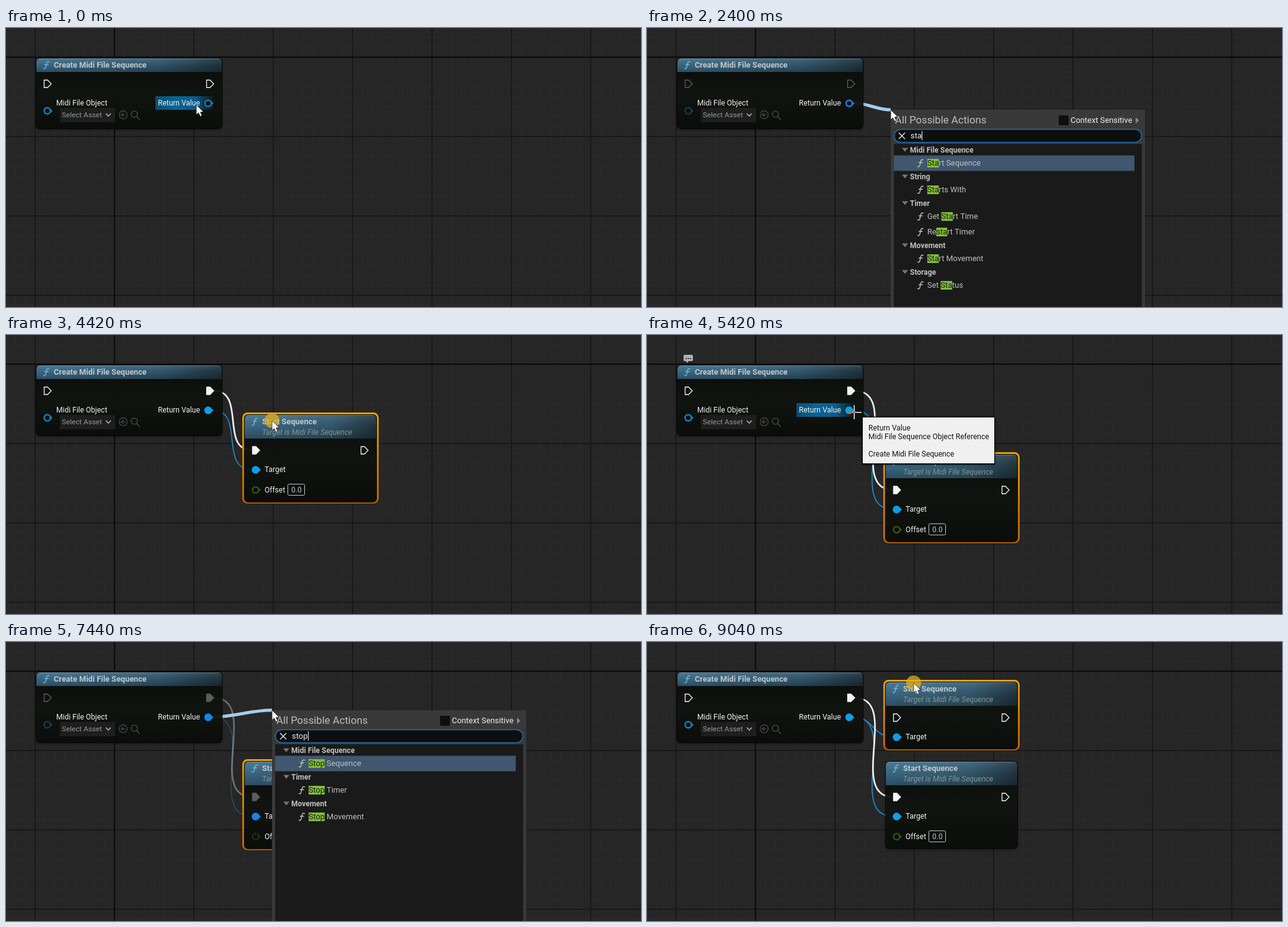
Write an HTML page with a canvas that moves like this. It is 1024x450 px and loops after 9440 ms.

```html
<!DOCTYPE html>
<html>
<head>
<meta charset="utf-8">
<style>
html, body { margin: 0; width: 100%; height: 100%; overflow: hidden; background: #262626; }
canvas { display: block; }
</style>
</head>
<body>
<canvas id="stage" width="1024" height="450"></canvas>
<script>
const g = document.getElementById('stage').getContext('2d');
const LOOP = 9440;
const FONT = 'Roboto, "Open Sans", sans-serif';
const BLUE = '#0e9fe6', RING = '#0f82bd', DIM = '#5c5c5c';
const RETURN = [333, 121], EXEC = [335, 90];

const categories = ['Accessibility', 'Activation', 'Actor', 'Add Component', 'Add Event', 'Advanced', 'AI',
  'Android File Server', 'Android Permission', 'Anim Notify', 'Animation', 'Animation Attributes',
  'Animation Data', 'Animation Data Model', 'Animation Graph'];

// '#' marks a category, '*' a starred row
const pathRows = ['*Not Equal ( != )', '*Subtract', '#Paths', 'Automation Dir', 'Automation Log Dir',
  'Automation Transient Dir', 'Bug It Dir', 'Change Extension', 'Cloud Dir',
  'Collapse Relative Directories', 'Combine', 'Convert from Sandbox Path'];
const library = {
  'Midi File Sequence': ['Start Sequence', 'Stop Sequence'],
  'String': ['Starts With', 'To String', 'Substring'],
  'Timer': ['Get Start Time', 'Restart Timer', 'Stop Timer'],
  'Movement': ['Stop Movement', 'Start Movement'],
  'Storage': ['Get Storage', 'Set Status']
};

const nodeTip = name => [192, 84, 21, [[32, name], [60, 'Target is Midi File Sequence']]];
const pinTip = [214, 76, 10, [[21, 'Return Value'], [35, 'Midi File Sequence Object Reference'],
  [63, 'Create Midi File Sequence']]];

// Each step changes part of the state from its time on
const steps = [
  [0, { at: [307, 124], cursor: 'arrow', hover: true }],
  [200, { at: [326, 123], cursor: 'cross' }],
  [400, { at: [335, 123], cursor: 'arrow', hover: false, drag: true, click: true }],
  [600, { at: [356, 126] }],
  [800, { at: [380, 130] }],
  [1000, { at: [393, 132] }],
  [1200, { menu: [393, 132], click: false, query: '' }],
  [1820, { query: 's' }],
  [2020, { query: 'st' }],
  [2220, { query: 'sta' }],
  [2420, { query: 'star' }],
  [2620, { query: 'start' }],
  [3020, { menu: null, drag: false, start: [384, 128], selected: 'start' }],
  [3220, { cursor: 'move' }],
  [3420, { tip: nodeTip('Start Sequence') }],
  [3620, { at: [407, 134], tip: null }],
  [3820, { at: [424, 137] }],
  [4020, { at: [429, 138], tip: nodeTip('Start Sequence') }],
  [4420, { tip: null, click: true, cursor: 'arrow' }],
  [4620, { at: [429, 170], start: [384, 160] }],
  [4820, { at: [429, 202], start: [384, 192] }],
  [5020, { at: [396, 168], click: false }],
  [5220, { at: [340, 126], hover: true, bubble: [59, 32] }],
  [5420, { at: [334, 124], cursor: 'cross', tip: pinTip }],
  [5620, { tip: null, hover: false, bubble: null, cursor: 'arrow', drag: true, click: true }],
  [5820, { at: [368, 120] }],
  [6020, { at: [408, 113] }],
  [6220, { at: [429, 110] }],
  [6440, { menu: [429, 110], click: false, query: '' }],
  [6840, { query: 's' }],
  [7040, { query: 'st' }],
  [7240, { query: 'sto' }],
  [7440, { query: 'stop' }],
  [7840, { menu: null, drag: false, stop: [416, 96], selected: 'stop' }],
  [8040, { at: [444, 106], cursor: 'move', bubble: [427, 80] }],
  [8240, { at: [456, 103], tip: nodeTip('Stop Sequence') }],
  [8840, { at: [443, 85], tip: null, bubble: null, stop: [400, 80], cursor: 'arrow', click: true }],
  [9040, { at: [430, 66], stop: [384, 64] }]
];

function rect(x, y, w, h, color) {
  g.fillStyle = color;
  g.fillRect(x, y, w, h);
}

function round(x, y, w, h, r, fill, stroke, width = 1) {
  g.beginPath();
  g.roundRect(x, y, w, h, r);
  paint(fill, stroke, width);
}

function poly(points, fill, stroke, width, open) {
  g.beginPath();
  for (let i = 0; i < points.length; i += 2) g.lineTo(points[i], points[i + 1]);
  if (!open) g.closePath();
  paint(fill, stroke, width);
}

function circle(x, y, r, fill, stroke, width) {
  g.beginPath();
  g.arc(x, y, r, 0, 7);
  paint(fill, stroke, width);
}

function paint(fill, stroke, width = 1) {
  if (fill) { g.fillStyle = fill; g.fill(); }
  if (stroke) { g.strokeStyle = stroke; g.lineWidth = width; g.stroke(); }
}

function text(str, x, y, size, color, style = '') {
  g.font = `${style} ${size}px ${FONT}`;
  g.fillStyle = color;
  g.fillText(str, x, y);
}

function gradient(x0, y0, x1, y1, ...colors) {
  const grad = g.createLinearGradient(x0, y0, x1, y1);
  colors.forEach((c, i) => grad.addColorStop(i / (colors.length - 1), c));
  return grad;
}

function grid() {
  rect(0, 0, 1024, 450, '#262626');
  const lines = (gap, color) => {
    for (let p = 46 % gap; p < 1024; p += gap) {
      rect(p, 0, 2, 450, color);
      rect(0, p, 1024, 2, color);
    }
  };
  lines(16, '#292929');
  lines(128, '#191919');
  rect(174, 0, 2, 450, '#0a0a0a');
  rect(0, 46, 1024, 2, '#0a0a0a');
}

function wire([x0, y0], [x1, y1], color, width) {
  const d = (Math.abs(x1 - x0) + Math.abs(y1 - y0)) / 3;
  g.beginPath();
  g.moveTo(x0, y0);
  g.bezierCurveTo(x0 + d, y0, x1 - d, y1, x1, y1);
  paint(null, color, width);
}

function execPin(x, y, filled, dim) {
  const color = dim ? DIM : '#f4f4f4';
  poly([x - 5.5, y - 6, x, y - 6, x + 6, y, x, y + 6, x - 5.5, y + 6], filled && color, color, 1.3);
}

function dataPin(x, y, color, filled) {
  circle(x, y, 5, filled ? color : '#0a0d0c', color, 2.4);
  poly([x + 5.5, y - 3, x + 8.5, y, x + 5.5, y + 3], color);
}

function funcIcon(x, y, color) {
  g.beginPath();
  g.moveTo(x - 5, y + 5);
  g.bezierCurveTo(x - 1, y + 8, x - .5, y + 1, x, y - 1);
  g.bezierCurveTo(x + .5, y - 5, x + 2, y - 7, x + 5, y - 5);
  g.moveTo(x - 3, y - 1);
  g.lineTo(x + 3.5, y - 1);
  paint(null, color, 1.4);
}

function lens(x, y, r, color) {
  circle(x, y, r, null, color, 1.6);
  poly([x + r * .7, y + r * .7, x + r * 1.7, y + r * 1.8], null, color, 1.8, true);
}

function nodeBox(x, y, w, h, bar, title, selected) {
  if (selected) {
    round(x - 1.5, y - 1.5, w + 3, h + 2, 7, null, gradient(0, y, 0, y + h, '#f5ab05', '#d06f05'), 3);
  }
  g.save();
  g.shadowColor = 'rgba(0,0,0,.55)';
  g.shadowBlur = 5;
  g.shadowOffsetY = 1;
  round(x + .5, y + .5, w - 1, h - 1, 6, gradient(0, y, 0, y + h, 'rgba(8,10,8,.9)', 'rgba(16,20,15,.9)', 'rgba(10,12,9,.92)'));
  g.restore();
  g.save();
  g.beginPath();
  g.roundRect(x + 1, y + 1, w - 2, h - 2, 5);
  g.clip();
  rect(x, y, w, bar, gradient(x, 0, x + w, 0, '#3f6f8c', '#3c6882', '#345b72', '#22353f'));
  rect(x, y, w, bar, gradient(0, y, 0, y + bar, 'rgba(255,255,255,.1)', 'rgba(0,0,0,.08)', 'rgba(0,0,0,.3)'));
  rect(x, y + 1, w, 1, 'rgba(150,190,210,.35)');
  g.restore();
  round(x + .5, y + .5, w - 1, h - 1, 6, null, 'rgba(0,0,0,.7)');
  funcIcon(x + 17, y + 12, '#70b8e2');
  text(title, x + 29, y + 16, 12.75, '#bfc8cc', 'bold');
}

function createNode(s) {
  nodeBox(48, 48, 301, 115, 23, 'Create Midi File Sequence');
  execPin(67, 90, false, s.drag);
  execPin(329, 90, s.start, s.drag);
  if (s.hover) {
    rect(241, 110, 96, 22, gradient(241, 0, 337, 0, 'rgba(11,92,136,.8)', '#0b6596', '#0b5c88', 'rgba(11,80,120,0)'));
  }
  text('Midi File Object', 81, 125, 12, '#f0f0f0');
  text('Return Value', 245, 125, 12, '#f0f0f0');
  dataPin(66.5, 133.5, s.drag ? '#123e50' : RING);
  dataPin(326, 121.5, s.drag ? '#1685e6' : s.start ? BLUE : RING, s.start);
  rect(87, 129, 89, 23, '#1d1e1d');
  text('Select Asset', 90, 143.5, 11.7, '#969a98');
  poly([161, 138, 165, 142, 169, 138], null, '#b0b0b0', 1.6, true);
  circle(189, 140, 6.5, null, '#434543', 1.4);
  poly([192.5, 140, 186, 140, 189, 137, 186, 140, 189, 143], null, '#434543', 1.4, true);
  lens(207, 139, 5, '#434543');
}

function sequenceNode([x, y], name, s) {
  const isStart = name == 'start', h = isStart ? 142 : 109;
  nodeBox(x, y, 214, h, 39, isStart ? 'Start Sequence' : 'Stop Sequence', s.selected == name);
  text('Target is Midi File Sequence', x + 29, y + 33, 12, '#87948d', 'italic');
  execPin(x + 19, y + 58, isStart, s.drag);
  execPin(x + 194, y + 58, false, s.drag);
  dataPin(x + 18.5, y + 89.5, s.drag ? '#1685e6' : BLUE, true);
  text('Target', x + 33, y + 93, 12, '#f0f0f0');
  if (!isStart) return;
  dataPin(x + 18.5, y + 122, s.drag ? '#1e2f0c' : '#365507');
  text('Offset', x + 33, y + 126, 12, '#f0f0f0');
  round(x + 70.5, y + 112.5, 27, 18, 2, '#0d0f0d', '#c4c4c4');
  text('0.0', x + 76, y + 126, 12, '#b4c2c6');
}

function wires(s) {
  g.globalAlpha = s.drag ? .35 : 1;
  for (const [x, y] of [s.stop, s.start].filter(Boolean)) {
    wire(RETURN, [x + 12, y + 89], '#1d8ccb', 1.7);
  }
  if (s.start) wire(EXEC, [s.start[0] + 13, s.start[1] + 58], '#f2f2f2', 2.6);
  g.globalAlpha = 1;
  if (s.drag) wire(RETURN, s.menu || s.at, '#a6cdea', 5.2);
}

function search(query) {
  if (query == 's') return pathRows;
  return Object.entries(library).flatMap(([name, items]) => {
    const found = items.filter(i => i.toLowerCase().includes(query));
    return found.length ? ['#' + name, ...found] : [];
  });
}

function marked(str, query, x, y, size, style) {
  g.font = `${style} ${size}px ${FONT}`;
  const low = str.toLowerCase(), width = n => g.measureText(str.slice(0, n)).width;
  text(str, x, y, size, '#c0c0c0', style);
  for (let i = low.indexOf(query); i >= 0; i = low.indexOf(query, i + 1)) {
    const left = x + width(i);
    rect(left, y - 11, x + width(i + query.length) - left, 14, '#82bb3c');
    text(str.substr(i, query.length), left, y, size, '#16240c', style);
  }
}

function star(x, y) {
  const points = [];
  for (let i = 0; i < 10; i++) {
    const a = i * Math.PI / 5, r = i % 2 ? 2.2 : 5;
    points.push(x + r * Math.sin(a), y - r * Math.cos(a));
  }
  poly(points, '#5a5d60');
}

function results(x, y, query) {
  const pick = query == 's' ? 'Subtract' : query.startsWith('sto') ? 'Stop Sequence' : 'Start Sequence';
  let top = y + 55.5;
  for (const row of search(query)) {
    const name = row.replace(/^[#*]/, '');
    if (row[0] == '#') {
      const c = top + 9;
      poly([x + 18, c - 3, x + 28, c - 3, x + 23, c + 3], '#777');
      marked(name, query, x + 31, c + 4, 12, 'bold');
      top += 18;
    } else {
      const c = top + 12.5;
      if (name == pick) rect(x + 5, top, 388, 25, '#40576f');
      if (row[0] == '*') star(x + 30, c);
      funcIcon(x + 48, c, '#b5c9a6');
      marked(name, query, x + 59, c + 4, 12.7, '');
      top += 25;
    }
  }
  if (query == 's') round(x + 395, y + 318, 8, 54, 4, '#575757');
}

function menu([x, y], query) {
  rect(x, y, 410, 450, '#383938');
  text('All Possible Actions', x + 7, y + 22, 16.7, '#bdbdbd');
  round(x + 271, y + 9, 16, 16, 2, '#0e0e0e');
  text('Context Sensitive', x + 290, y + 21, 12.9, '#f0f0f0');
  poly([x + 395, y + 12, x + 400.5, y + 17, x + 395, y + 22], '#858585');
  rect(x + 5, y + 55, 400, 450, '#1a1a1a');
  round(x + 5.5, y + 31.5, 399, 21, 10.5, '#0e0e0e', '#1d6fbd', 1.5);
  if (query) {
    const c = y + 42;
    for (const d of [5, -5]) poly([x + 13, c - d, x + 23, c + d], null, '#d8d8d8', 1.6, true);
    text(query, x + 32, c + 4, 13, '#f0f0f0');
    rect(Math.round(x + 32 + g.measureText(query).width), y + 34, 1, 15, '#f0f0f0');
    results(x, y, query);
    return;
  }
  lens(x + 17, y + 41, 4.5, '#e8e8e8');
  text('Search', x + 32, y + 46, 13, '#767676');
  categories.forEach((name, i) => {
    const c = y + 64 + i * 18;
    poly([x + 10, c - 5, x + 16, c, x + 10, c + 5], '#6c6c6c');
    text(name, x + 21, c + 4, 12, '#c2c2c2', 'bold');
  });
  round(x + 395, y + 58, 8, 53, 4, '#575757');
}

function bubble([x, y]) {
  round(x, y, 15, 10, 1.5, '#b4b4b4');
  poly([x + 3, y + 9, x + 9, y + 9, x + 6, y + 13], '#b4b4b4');
  for (const dx of [3, 6.5, 10]) rect(x + dx, y + 5, 2, 2, '#333');
}

function tooltip([mx, my], [w, h, pad, lines]) {
  const x = mx + 13, y = my + 9;
  g.save();
  g.shadowColor = 'rgba(0,0,0,.6)';
  g.shadowBlur = 4;
  rect(x, y - 1, w, h + 1, '#0c0c0c');
  g.restore();
  rect(x + 1, y, w - 2, h - 2, '#f0f0f0');
  for (const [dy, str] of lines) text(str, x + pad, y + dy, 12, '#141414');
}

function pointer([x, y], kind) {
  g.save();
  g.translate(x, y);
  if (kind == 'cross') {
    g.globalCompositeOperation = 'difference';
    rect(-11, 0, 23, 1.5, '#fff');
    rect(-.5, -11, 1.5, 23, '#fff');
  } else if (kind == 'move') {
    for (let pass = 0; pass < 2; pass++) {
      for (let i = 0; i < 4; i++) {
        g.rotate(Math.PI / 2);
        poly([0, 0, 0, -8], null, pass ? '#fff' : '#000', pass ? 2 : 4, true);
        poly([-4, -6, 0, -10.5, 4, -6], pass ? '#fff' : '#000', pass ? null : '#000', 2);
      }
    }
  } else {
    poly([0, 0, 0, 16, 3.6, 12.8, 6.2, 18.6, 9, 17.4, 6.5, 11.8, 11.3, 11.3], '#fff', '#222', .8);
  }
  g.restore();
}

function draw(t) {
  const s = Object.assign({}, ...steps.filter(([time]) => time <= t).map(step => step[1]));
  grid();
  wires(s);
  createNode(s);
  if (s.stop) sequenceNode(s.stop, 'stop', s);
  if (s.start) sequenceNode(s.start, 'start', s);
  if (s.bubble) bubble(s.bubble);
  if (s.menu) menu(s.menu, s.query);
  if (s.tip) tooltip(s.at, s.tip);
  if (s.click) circle(...s.at, 12, 'rgba(232,178,30,.72)');
  pointer(s.at, s.cursor);
}

const begin = performance.now();
function tick() {
  draw((performance.now() - begin) % LOOP);
  requestAnimationFrame(tick);
}
tick();
</script>
</body>
</html>
```
